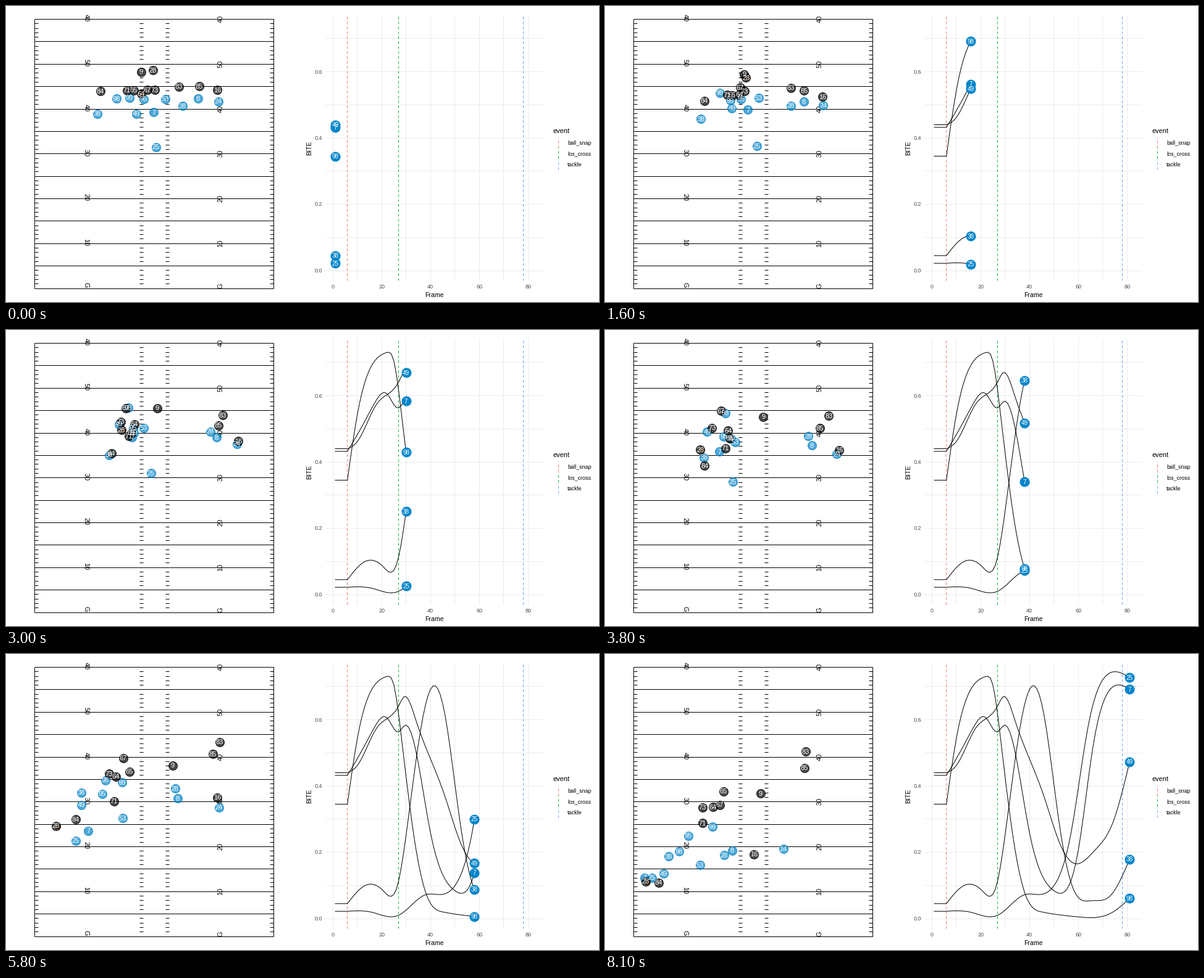
Recreate the animation shown at these times as a matplotlib script. Size 960 by 480 pixels, loop 8.2 s.

```python
import matplotlib.pyplot as plt
import numpy as np
from matplotlib.animation import FuncAnimation
from matplotlib.collections import LineCollection

W, H, DPI = 960, 480, 80
PX = 72 / DPI  # points per pixel
N = 82
FRAMES = np.arange(1, N)
SNAP, CROSS, TACKLE = 6, 27, 78
KEYS = [SNAP, 30, 58, 81]
RED, GREEN, BLUE = "#f8766d", "#00ba38", "#619cff"
TEAM = "#0085ca"

plt.rcParams["font.family"] = ["Liberation Sans", "DejaVu Sans"]
fig = plt.figure(figsize=(W / DPI, H / DPI), dpi=DPI, facecolor="white")
ax = fig.add_axes([0, 0, 1, 1])
ax.set_xlim(0, W)
ax.set_ylim(H, 0)
ax.axis("off")


def spline(t, v, at_rest=False):
    """Cubic spline through (t, v) at every frame, held still before t[0]."""
    t, v = np.asarray(t, float), np.asarray(v, float)
    n, h = len(t), np.diff(t)
    d = np.diff(v) / h
    a, b = np.zeros((n, n)), np.zeros(n)
    a[0, :2], b[0] = ((1, 0), 0) if at_rest else ((2, 1), 3 * d[0])
    a[-1, -2:], b[-1] = (1, 2), 3 * d[-1]
    for k in range(1, n - 1):
        a[k, k - 1:k + 2] = h[k], 2 * (h[k - 1] + h[k]), h[k - 1]
        b[k] = 3 * (h[k] * d[k - 1] + h[k - 1] * d[k])
    m = np.linalg.solve(a, b)
    f = np.maximum(FRAMES, t[0])
    i = np.clip(np.searchsorted(t, f, side="right") - 1, 0, n - 2)
    s = (f - t[i]) / h[i]
    return ((1 + 2 * s) * (1 - s) ** 2 * v[i] + s * (1 - s) ** 2 * h[i] * m[i]
            + s * s * (3 - 2 * s) * v[i + 1] + s * s * (s - 1) * h[i] * m[i + 1])


def ease(start, end):
    s = np.clip((FRAMES - start) / (end - start), 0, 1)
    return s * s * (3 - 2 * s)


def segments(segs, color, z):
    """Rules of one pixel; whole coordinates snap to pixel centres."""
    ax.add_collection(LineCollection(np.floor(segs).reshape(-1, 2, 2), colors=color,
                                     linewidths=PX, zorder=z))


def label(x, y, s, size, color="black", z=3, ha="center", va="center", **kw):
    return ax.text(x, y, s, fontsize=size * PX, color=color, zorder=z, ha=ha, va=va, **kw)


def dashed(x, y0, y1, color):
    x = np.floor(x)
    ax.plot([x, x], [y0, y1], color=color, lw=PX, dashes=(4, 4),
            dash_capstyle="butt", zorder=2)


def dot(size, fill, edge, z):
    return ax.plot([], [], "o", ms=size * PX, mfc=fill, mec=edge, mew=PX, zorder=z)[0]


def gx(frame):
    return 529 + 3.955 * frame


def gy(value):
    return 429 - 537.5 * value


LEFT, RIGHT, GOAL, YARD = 46, 433, 458, 7.275


def draw_field():
    lines = [(LEFT, GOAL - YARD * k, RIGHT, GOAL - YARD * k) for k in range(0, 61, 5)]
    lines += [(x, GOAL - 60 * YARD, x, GOAL) for x in (LEFT, RIGHT)]
    lines += [(x, GOAL - YARD * k, x + 6, GOAL - YARD * k)
              for k in range(1, 60) for x in (46, 216, 258, 427)]
    segments(lines, "black", 1)
    for k, s in enumerate(["G", "10", "20", "30", "40", "50", "40"]):
        y = GOAL - 10 * YARD * k - (4 if k == 0 else 0)
        label(129.5, y - 2, s, 11, rotation=270)
        label(347.5, y - 0.5, s, 11, rotation=90)


def draw_chart():
    segments([(517, gy(k / 10), 869, gy(k / 10)) for k in range(8)]
             + [(gx(k), 13, gx(k), 445) for k in range(0, 90, 10)], "#ebebeb", 1)
    for k in range(0, 8, 2):
        label(512.5, gy(k / 10) + 0.5, f"{k / 10:.1f}", 9, "#4d4d4d", ha="right")
    for k in range(0, 100, 20):
        label(gx(k), 456, str(k), 9, "#4d4d4d")
    label(693.5, 469.5, "Frame", 10.5)
    label(491.5, 230, "BITE", 10.5, rotation=90)
    label(886, 206, "event", 11, ha="left", va="baseline")
    events = [("ball_snap", SNAP, RED), ("los_cross", CROSS, GREEN), ("tackle", TACKLE, BLUE)]
    for k, (name, frame, color) in enumerate(events):
        y = 222 + 17.3 * k
        dashed(gx(frame), 445, 16, color)
        dashed(894, y + 8, y - 9, color)
        label(909, y + 3, name, 9, ha="left", va="baseline")


draw_field()
draw_chart()

movers = []  # (artists, xs, ys)
curves = []  # (line, xs, ys)


def player(num, home, *spots):
    """Stand still until the snap, then run smoothly through the key spots."""
    xs, ys = (spline(KEYS, v, at_rest=True) for v in zip(*spots))
    if home:
        mark = dot(14, (0, 0.52, 0.79, 0.7), (0, 0.47, 0.72, 0.75), 4)
    else:
        mark = dot(14, (0, 0, 0, 0.72), (0, 0, 0, 0.8), 6)
    movers.append(((mark, label(0, 0, num, 11, "white", 7)), xs, ys))
    return np.array([xs, ys])


def curve(num, *points):
    """Points are (frame, value), mostly peaks, dips and midpoints."""
    xs, ys = gx(FRAMES), gy(spline(*zip(*points)))
    line = ax.plot([], [], color="black", lw=PX, zorder=3)[0]
    curves.append((line, xs, ys))
    movers.append(((dot(15, TEAM, TEAM, 4), label(0, 0, num, 10, "white", 7)), xs, ys))


# Defence
player("38", True, (148, 175), (167, 203), (122, 225), (103, 328))
player("98", True, (179, 150), (198, 126), (161, 205), (120, 320))
player("99", True, (200, 149), (207, 167), (188, 208), (174, 280))
player("49", True, (211, 175), (183, 153), (122, 245), (95, 356))
player("95", True, (223, 151), (206, 159), (156, 227), (135, 295))
player("7", True, (239, 172), (204, 174), (133, 287), (64, 363))
player("53", True, (258, 151), (223, 159), (189, 266), (154, 342))
player("28", True, (286, 162), (331, 165), (274, 218), (193, 326))
player("8", True, (311, 150), (341, 174), (278, 234), (206, 319))
player("24", True, (344, 155), (374, 185), (345, 249), (289, 316))
player("25", True, (243, 229), (235, 232), (113, 303), (76, 363))

# Offence
player("84", False, (153, 138), (171, 200), (113, 268), (87, 371))
player("71", False, (196, 137), (199, 172), (175, 239), (158, 274))
player("65", False, (207, 137), (203, 167), (200, 191), (192, 223))
center = player("64", False, (219, 142), (208, 153), (178, 199), (175, 248))
player("67", False, (229, 136), (194, 127), (190, 169), (186, 245))
player("73", False, (241, 136), (186, 149), (167, 194), (158, 249))
passer = player("9", False, (219, 107), (245, 127), (270, 181), (252, 226))
runner = player("28", False, (238, 104), (187, 162), (81, 279), (66, 369))
player("83", False, (280, 131), (351, 138), (346, 143), (325, 158))
player("85", False, (313, 130), (344, 155), (335, 162), (323, 185))
player("16", False, (342, 136), (376, 180), (342, 233), (241, 325))

# The ball is snapped back, then handed off
ball = center + (passer - center) * ease(SNAP, 11)
ball += (runner + [[3], [1]] - ball) * ease(12, 18)
movers.append(((dot(8, (0.75, 0.42, 0.1, 0.85), "none", 5),), *ball))

curve("98", (6, .345), (10, .541), (16, .692), (22, .730), (25, .705), (28, .553),
      (33, .259), (38, .079), (45, .020), (60, .005), (74, .019), (81, .061))
curve("7", (6, .432), (12, .508), (17, .576), (22, .607), (27, .563), (29.5, .583),
      (33, .538), (40, .259), (50, .084), (60, .207), (66, .519), (72, .681), (81, .692))
curve("49", (6, .440), (10, .461), (18, .575), (27, .642), (29.3, .670), (34, .599),
      (46, .367), (52, .234), (58, .167), (67, .208), (74, .287), (81, .473))
curve("38", (6, .045), (13, .099), (20.5, .085), (26.5, .100), (30, .251), (36, .571),
      (41.5, .703), (46, .612), (52, .296), (57, .108), (65.5, .054), (73, .068), (81, .179))
curve("25", (6, .022), (16, .019), (27, .010), (38, .072), (45, .073), (50, .099),
      (57, .258), (64, .580), (72, .737), (81, .727))


def draw(n):
    frame = max(n, 2) if n else 1
    for line, xs, ys in curves:
        line.set_data(xs[:frame], ys[:frame])
    for (mark, *texts), xs, ys in movers:
        x, y = xs[frame - 1], ys[frame - 1]
        mark.set_data([x], [y])
        for text in texts:
            text.set_position((x, y + 0.5))


anim = FuncAnimation(fig, draw, frames=N, interval=100, repeat=True, repeat_delay=0)
plt.show()
```
